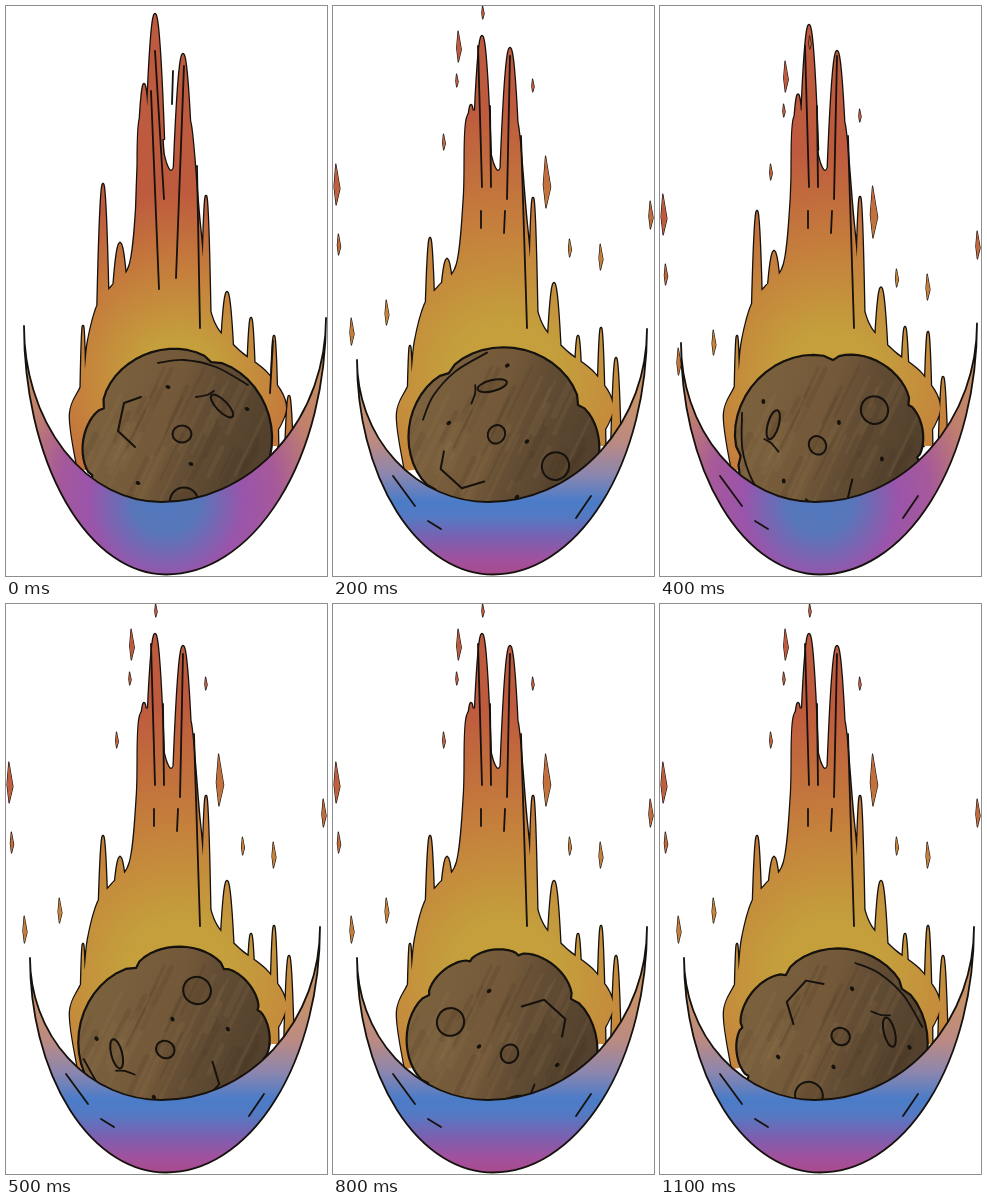
These frames come from a looping animation (321 by 570 pixels, 1.2 s). An HTML page with a canvas:

```html
<!DOCTYPE html>
<html>
<head>
<meta charset="utf-8">
<title>Falling meteor</title>
<style>
html, body { margin: 0; width: 100%; height: 100%; overflow: hidden; background: #fff; }
canvas { display: block; }
</style>
</head>
<body>
<canvas id="stage" width="321" height="570"></canvas>
<script>
const ctx = document.getElementById('stage').getContext('2d');
const INK = '#15110d';
const ROCK = { x: 170, y: 439 };
const mix = (a, b, t) => a + (b - a) * t;

// Flame tongues: x, tip when tall, tip when broken, spread
const tongues = [
  [77, 320, 340, .3], [97, 178, 232, .5], [114, 237, 253, 1], [138, 78, 99, .7], [149, 8, 30, .8],
  [177, 48, 42, .85], [200, 190, 192, .4], [221, 286, 277, .8], [245, 312, 330, .5],
  [268, 330, 322, .4], [283, 390, 352, .5]
];
const flameBody = [72,465, 64,408, 77,375, 82,335, 92,298, 106,280, 124,258, 131,190, 134,112, 153,112,
  158,150, 165,165, 171,150, 176,112, 185,120, 194,220, 205,308, 230,342, 262,368, 280,402, 262,440];
const tallLines = [[145,85, 153,283], [149,45, 158,193], [178,60, 170,272], [191,160, 194,322],
  [167,65, 166,98], [267,335, 264,387]];
const brokenLines = [[145,40, 149,181], [157,100, 158,181], [177,50, 174,193], [188,130, 194,322],
  [148,205, 148,222], [172,205, 171,227], [60,470, 82,500], [95,515, 108,523], [258,490, 243,512]];

// Loose embers: x, top, height
const embers = [[126,25,31], [150,0,13], [124,68,13], [111,128,16], [200,73,13], [4,158,41], [6,228,21],
  [214,150,52], [318,195,28], [237,233,18], [268,238,26], [54,294,25], [19,312,27]];

function spline(p) {
  const n = p.length / 2;
  const at = i => {
    const k = Math.max(0, Math.min(n - 1, i)) * 2;
    return [p[k], p[k + 1]];
  };
  ctx.lineTo(p[0], p[1]);
  for (let i = 0; i < n - 1; i++) {
    const [a, b, c, d] = [at(i - 1), at(i), at(i + 1), at(i + 2)];
    ctx.bezierCurveTo(b[0] + (c[0] - a[0]) / 6, b[1] + (c[1] - a[1]) / 6,
      c[0] - (d[0] - b[0]) / 6, c[1] - (d[1] - b[1]) / 6, c[0], c[1]);
  }
}

function ink(width) {
  ctx.strokeStyle = INK;
  ctx.lineWidth = width;
  ctx.stroke();
}

function strokePath(points, width = 1.8) {
  ctx.beginPath();
  spline(points);
  ink(width);
}

function gradient(g, stops) {
  for (const [at, colour] of stops) g.addColorStop(at, colour);
  return g;
}

// A tongue widens with the square root of the distance below its tip.
function tonguePath(x, top, spread) {
  const depth = Math.min(125, 440 - top);
  for (let k = -10; k <= 10; k++) {
    const u = k / 10;
    const px = x + spread * Math.sqrt(depth) * u, py = top + depth * u * u;
    k === -10 ? ctx.moveTo(px, py) : ctx.lineTo(px, py);
  }
}

function drawFlame(t) {
  ctx.beginPath();
  ctx.moveTo(flameBody[0], flameBody[1]);
  spline(flameBody);
  for (const [x, tall, broken, spread] of tongues) tonguePath(x, mix(tall, broken, t), spread);
  ink(2.6);
  ctx.fillStyle = gradient(ctx.createRadialGradient(172, 370, 0, 172, 370, mix(185, 270, t)),
    [[.2, '#c49f3c'], [.55, '#c5803c'], [1, '#be5a3e']]);
  ctx.fill();
}

function drawEmbers(drop) {
  for (const [x, top, h] of embers) {
    const y = top + drop, w = .3 + h * .065;
    ctx.beginPath();
    ctx.moveTo(x - w * .4, y);
    ctx.lineTo(x + w, y + h * .6);
    ctx.lineTo(x - w * .3, y + h);
    ctx.lineTo(x - w, y + h * .55);
    ctx.closePath();
    ink(1.2);
    ctx.fill();
  }
}

// Rock outline: lumps between notches, given as angle and radius
const notches = [[-32, 85], [67, 90], [153, 81], [200, 89], [232, 88], [267, 88], [328, 85]];

function rockPath() {
  ctx.beginPath();
  for (let i = 1; i < notches.length; i++) {
    const [a0, r0] = notches[i - 1], [a1, r1] = notches[i];
    const lift = Math.min(10, (a1 - a0) / 6);
    for (let k = 0; k <= 16; k++) {
      const u = k / 16, a = mix(a0, a1, u) * Math.PI / 180;
      const r = mix(r0, r1, u) + lift * Math.pow(4 * u * (1 - u), .6);
      ctx.lineTo(r * Math.cos(a), -r * Math.sin(a));
    }
  }
  ctx.closePath();
}

function drawStreaks() {
  let seed = 7;
  const rnd = () => (seed = seed * 16807 % 2147483647) / 2147483647;
  ctx.fillStyle = gradient(ctx.createLinearGradient(85, 400, 250, 455),
    [[0, '#7c613e'], [.45, '#735939'], [.62, '#634d34'], [1, '#53412d']]);
  ctx.fillRect(60, 330, 220, 220);
  for (let i = 0; i < 46; i++) {
    const x = 85 + rnd() * 180, y = 345 + rnd() * 110, len = 25 + rnd() * 55;
    ctx.strokeStyle = rnd() < .5 ? 'rgba(150,122,80,.15)' : 'rgba(55,40,25,.13)';
    ctx.lineWidth = 2 + rnd() * 5;
    ctx.beginPath();
    ctx.moveTo(x, y);
    ctx.lineTo(x - len * .48, y + len);
    ctx.stroke();
  }
}

function crater(x, y, rx, ry, tilt = 0) {
  ctx.beginPath();
  ctx.ellipse(x, y, rx, ry, tilt, 0, 7);
  ctx.fillStyle = 'rgba(60,42,26,.15)';
  ctx.fill();
  ink(2);
}

function drawRock(step) {
  const turn = -step * Math.PI / 6;
  ctx.save();
  ctx.translate(ROCK.x, ROCK.y);
  ctx.rotate(turn);
  // The shading stays upright while the outline and craters turn.
  ctx.save();
  rockPath();
  ctx.clip();
  ctx.rotate(-turn);
  ctx.translate(-ROCK.x, -ROCK.y);
  drawStreaks();
  ctx.restore();

  rockPath();
  ink(2.2);
  strokePath([-18, -82, 8, -85, 40, -78, 72, -60]);
  crater(6, -11, 9.5, 8.5);
  crater(8, 56, 14, 13.5);
  crater(46, -39, 15, 5.5, .8);
  strokePath([20, -48, 31, -50, 38, -54]);
  ctx.beginPath();
  for (const [x, y] of [[-35, -48], [-52, -42], [-58, -14], [-41, 2]]) ctx.lineTo(x, y);
  ink(2);
  ctx.fillStyle = INK;
  for (const [x, y] of [[-8, -58], [15, 19], [-38, 38], [71, -36]]) {
    ctx.beginPath();
    ctx.ellipse(x, y, 2.5, 1.9, .4, 0, 7);
    ctx.fill();
  }
  ctx.restore();
}

// The crescent is bounded by quarter ellipses that meet at the two tips.
function drawBowl(t) {
  const left = [mix(18, 24, t), mix(320, 354, t)], right = [mix(320, 314, t), mix(312, 323, t)];
  const quarter = (tip, x, bottom, from, to, back) =>
    ctx.ellipse(x, tip[1], Math.abs(tip[0] - x), bottom - tip[1], 0, from, to, back);
  const half = Math.PI / 2;
  ctx.beginPath();
  quarter(left, 155, 496, Math.PI, half, true);
  quarter(right, 155, 496, half, 0, true);
  quarter(right, 160, 568.5, 0, half);
  quarter(left, 160, 568.5, half, Math.PI);
  ctx.closePath();
  ctx.fillStyle = t === 1
    ? gradient(ctx.createLinearGradient(0, 323, 0, 569), [[0, '#c98d58'], [.3, '#c6926a'], [.46, '#bb8a82'],
      [.59, '#8c86ae'], [.7, '#4b7cc8'], [.76, '#537ac4'], [.86, '#7e5eae'], [.94, '#a2519d'], [1, '#a84a8c']])
    : gradient(ctx.createRadialGradient(160, 495, 0, 160, 495, 195), [[0, '#5279bd'], [.17, '#5876ba'],
      [.4, '#9a54aa'], [.57, '#a6599a'], [.8, '#c0806c'], [1, '#c58c60']]);
  ctx.fill();
  ink(1.8);
}

function draw() {
  const step = Math.floor(performance.now() / 100) % 12;
  const t = step % 3 / 2;
  ctx.fillStyle = '#fff';
  ctx.fillRect(0, 0, 321, 570);
  ctx.lineCap = ctx.lineJoin = 'round';
  drawFlame(t);
  if (t > 0) drawEmbers(60 * (1 - t));
  drawRock(step);
  drawBowl(t);
  for (const line of t > 0 ? brokenLines : tallLines) strokePath(line);
  requestAnimationFrame(draw);
}
draw();
</script>
</body>
</html>
```
